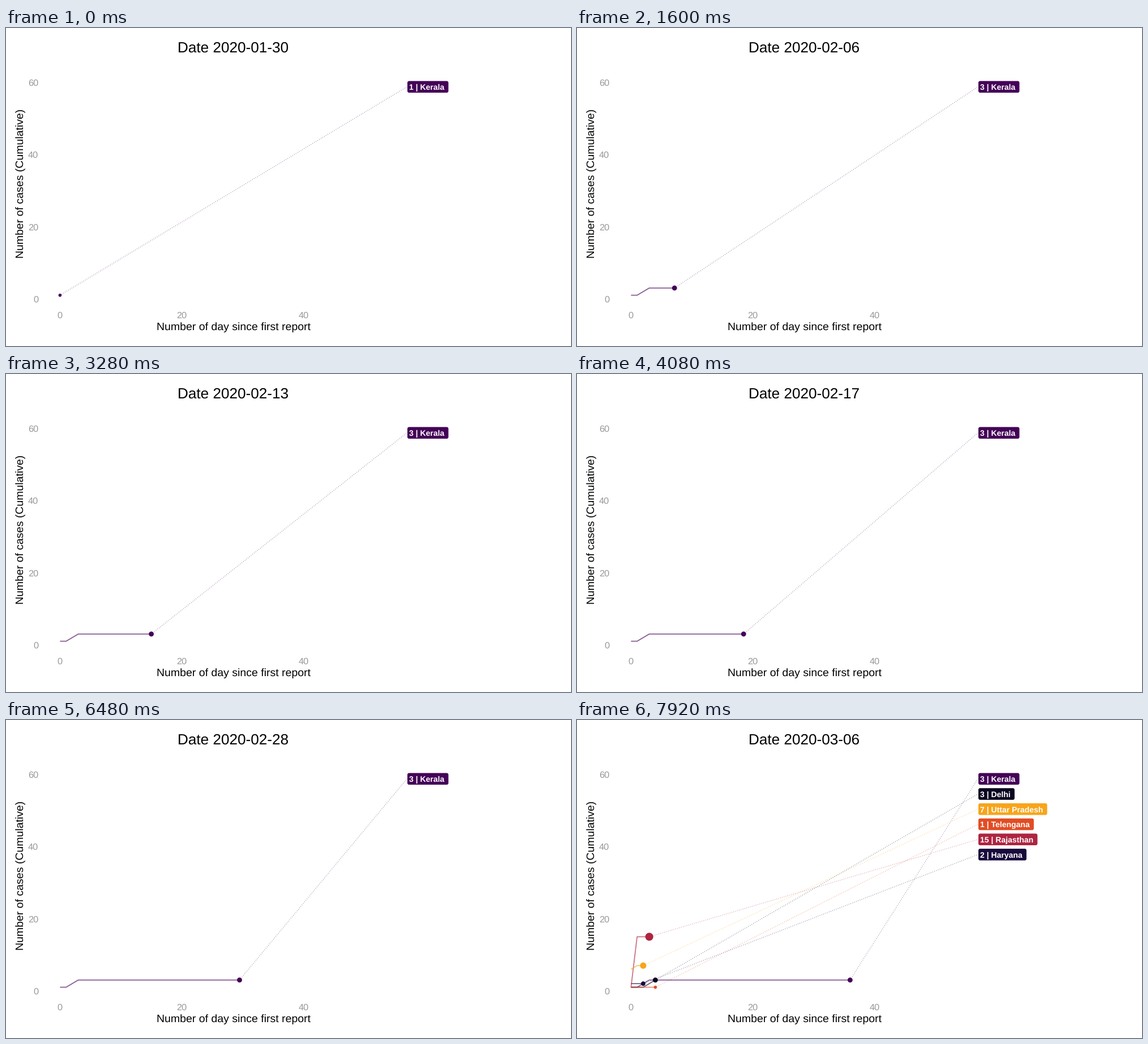
A matplotlib script that plays this animation: 998x561 px, repeating every 8000 ms.

```python
import matplotlib.pyplot as plt
import numpy as np
from matplotlib.animation import FuncAnimation
from matplotlib.patches import Circle, FancyBboxPatch

W, H, DPI = 998, 561, 100
PT = 72 / DPI
FRAMES, INTERVAL = 100, 80
FRAMES_PER_DAY = 2.75
START = np.datetime64("2020-01-30")
LABEL_DAY = 57

plt.rcParams["font.family"] = "Liberation Sans"
plt.rcParams["text.hinting"] = "no_hinting"

# name, first day, cumulative cases per day (last value holds), colour, label slot
STATES = [
    ("Delhi", 32, [1, 1, 1, 2, 3], "#0c0720", 1),
    ("Haryana", 34, [2], "#180b3b", 5),
    ("Kerala", 0, [1, 1, 2, 3], "#440257", 0),
    ("Rajasthan", 33, [1, 15], "#ae2441", 4),
    ("Telengana", 32, [1], "#e24c23", 3),
    ("Uttar Pradesh", 34, [6, 7], "#f7a51b", 2),
]

day_frames = np.round(FRAMES_PER_DAY * np.arange(38))


def px(day):
    return 95.4 + 10.75 * day


def py(cases):
    return 477.8 - 6.36 * cases


def radius(cases):
    return 2.8 + 1.13 * np.sqrt(cases - 1)


def cubic_in_out(t):
    return 4 * t**3 if t < 0.5 else 1 - 4 * (1 - t) ** 3


def day_and_progress(frame):
    """Whole day reached at this frame and the eased way to the next one."""
    day = int(np.searchsorted(day_frames, frame, side="right")) - 1
    span = day_frames[day + 1] - day_frames[day]
    return day, cubic_in_out((frame - day_frames[day]) / span)


fig = plt.figure(figsize=(W / DPI, H / DPI), dpi=DPI, facecolor="white")
ax = fig.add_axes([0, 0, 1, 1])
ax.set(xlim=(0, W), ylim=(H, 0))
ax.axis("off")


def write(x, y, text, size, **style):
    return ax.text(x, y, text, fontsize=size * PT, va="baseline", **style)


class Trace:
    def __init__(self, name, first_day, cases, color, slot):
        self.name, self.first_day, self.cases = name, first_day, cases
        self.end_y = py(4.2 * (14 - slot))
        self.leader, = ax.plot([], [], color=color, lw=1.05 * PT, alpha=0.65,
                               ls=(0, (0.82, 2.46)), zorder=1, snap=False)
        self.line, = ax.plot([], [], color=color, lw=1.75 * PT, alpha=0.65,
                             solid_capstyle="butt", zorder=2, snap=False)
        self.dot = Circle((0, 0), 1, fc=color, lw=0, zorder=3, snap=False)
        self.box = FancyBboxPatch(
            (px(LABEL_DAY) + 0.85, self.end_y - 10.3), 72, 20.6,
            boxstyle="round,pad=0,rounding_size=3", fc=color, lw=0,
            zorder=4, snap=False)
        ax.add_patch(self.dot)
        ax.add_patch(self.box)
        self.label = write(px(LABEL_DAY) + 3.8, self.end_y + 5.2, "", 14,
                           color="white", weight="bold", zorder=5)
        self.artists = [self.leader, self.line, self.dot, self.box, self.label]

    def value(self, age):
        return self.cases[min(age, len(self.cases) - 1)]

    def update(self, day, progress):
        age = day - self.first_day
        for artist in self.artists:
            artist.set_visible(age >= 0)
        if age < 0:
            return
        now, nxt = self.value(age), self.value(age + 1)
        x = px(age + progress)
        y = py(now + (nxt - now) * progress)

        ages = range(age + 1)
        self.line.set_data([px(a) for a in ages] + [x],
                           [py(self.value(a)) for a in ages] + [y])
        self.leader.set_data([x, px(LABEL_DAY)], [y, self.end_y])
        self.dot.set_center((x, y))
        self.dot.set_radius(radius(now) + (radius(nxt) - radius(now)) * progress)
        shown = now if progress < 0.5 else nxt
        self.label.set_text(f"{shown} | {self.name}")
        self.box.set_width(self.label.get_window_extent().width + 10.2)


title = write(303, 43.2, "", 26.1, color="black")
write(402, 533, "Number of day since first report", 19.5, ha="center")
write(31, 274.3, "Number of cases (Cumulative)", 19.5, ha="center",
      rotation=90, rotation_mode="anchor")
for tick in (0, 20, 40, 60):
    write(57.2, py(tick) + 5.8, str(tick), 16.4, ha="right", color="#999999")
    if tick < 60:
        write(px(tick), 511.4, str(tick), 16.4, ha="center", color="#999999")

traces = [Trace(*state) for state in STATES]


def update(frame):
    title.set_text(f"Date {START + int(frame / FRAMES_PER_DAY)}")
    day, progress = day_and_progress(frame)
    for trace in traces:
        trace.update(day, progress)
    return []


anim = FuncAnimation(fig, update, frames=FRAMES, interval=INTERVAL,
                     init_func=lambda: [], repeat=True, repeat_delay=0)
plt.show()
```
